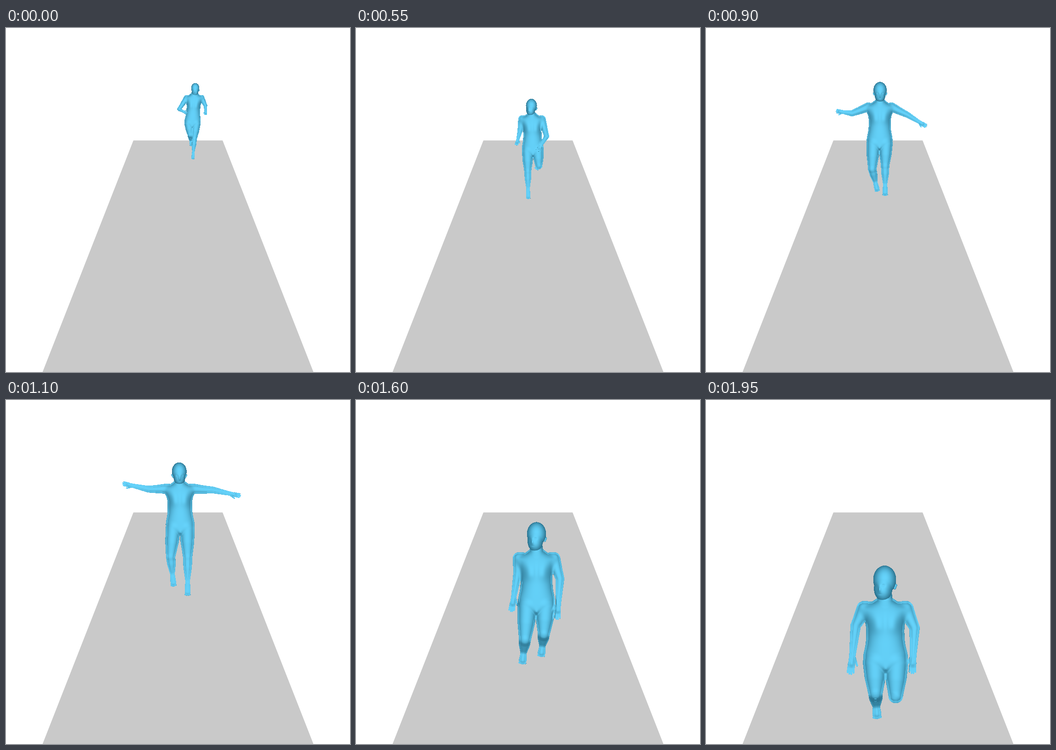
Write an HTML page with a canvas that moves like this. It is 748 px wide and 748 px high and loops after 2000 ms.

```html
<!DOCTYPE html>
<html lang="en">
<head>
<meta charset="utf-8">
<title>Running figure</title>
<style>
  html, body { margin: 0; width: 100%; height: 100%; overflow: hidden; background: #fff; }
  svg, canvas { position: absolute; left: 0; top: 0; width: 748px; height: 748px; display: block; }
</style>
</head>
<body>
<svg viewBox="0 0 748 748"><path d="M277 244.5H471L668.5 748H79.5Z" fill="#c9c9c9"/></svg>
<canvas id="stage" width="748" height="748"></canvas>
<script>
const SIZE = 748, LOOP = 2000, STEP = 50;
const ctx = document.getElementById('stage').getContext('2d');
const image = ctx.createImageData(SIZE, SIZE);
const height = new Float32Array(SIZE * SIZE);
const DARK = [40, 110, 137], LIGHT = [102, 212, 252];

// Key poses: the third head value is its turn, pairs go left then right.
const keys = [
  { time: 0, head: [411, 133, -.15], hip: [405, 203],
    elbows: [376, 176, 433, 168], hands: [392, 185, 434, 189],
    knees: [400, 232, 409, 240], toes: [402, 252, 406, 281] },
  { time: 200, head: [411, 156, .1], hip: [397, 227],
    elbows: [370, 202, 429, 200], hands: [361, 240, 436, 235],
    knees: [386, 263, 405, 264], toes: [389, 270, 401, 301] },
  { time: 550, head: [381, 172, -.5], hip: [384, 262],
    elbows: [356, 224, 414, 235], hands: [348, 255, 393, 268],
    knees: [373, 311, 397, 299], toes: [374, 366, 394, 303] },
  { time: 900, head: [378, 139, 0], hip: [377, 245],
    elbows: [317, 185, 437, 188], hands: [282, 180, 480, 214],
    knees: [361, 306, 389, 299], toes: [371, 349, 389, 358] },
  { time: 1300, head: [377, 256, 0], hip: [382, 375],
    elbows: [312, 285, 457, 288], hands: [243, 282, 519, 300],
    knees: [357, 450, 402, 455], toes: [357, 521, 401, 538] },
  { time: 1600, head: [392, 297, -.45], hip: [392, 440],
    elbows: [351, 376, 443, 388], hands: [337, 462, 437, 479],
    knees: [367, 520, 408, 508], toes: [362, 565, 403, 549] },
  { time: 1950, head: [388, 398, -.45], hip: [390, 562],
    elbows: [325, 490, 453, 495], hands: [313, 599, 448, 597],
    knees: [368, 637, 412, 643], toes: [371, 682, 411, 645] }
];

const clamp = (v, lo, hi) => Math.min(hi, Math.max(lo, v));
const mix = (a, b, t) => a + (b - a) * t;
const between = (p, q, t) => [mix(p[0], q[0], t), mix(p[1], q[1], t)];
const bell = (x, y, w) => Math.exp(-(x * x + y * y) / (w * w));

// The figure grows as it nears the camera.
const scaleAt = time => 18 * Math.exp(time / 1910);

function hermite(a, b, ma, mb, u) {
  const v = u * u, w = v * u;
  return (2*w - 3*v + 1) * a + (w - 2*v + u) * ma + (3*v - 2*w) * b + (w - v) * mb;
}

function poseAt(time) {
  const last = keys.length - 1;
  let i = 0;
  while (i < last - 1 && time >= keys[i + 1].time) i++;
  const a = keys[i], b = keys[i + 1], p = keys[Math.max(0, i - 1)], n = keys[Math.min(last, i + 2)];
  const span = b.time - a.time, u = (time - a.time) / span;
  const blend = part => a[part].map((v, j) => {
    const w = b[part][j];
    const ma = (w - p[part][j]) / (b.time - p.time) * span;
    const mb = (n[part][j] - v) / (n.time - a.time) * span;
    return hermite(v, w, ma, mb, u);
  });
  return Object.fromEntries(Object.keys(a).filter(k => k !== 'time').map(k => [k, blend(k)]));
}

const softMax = (a, b, seam) => Math.max(a, b) + Math.max(0, seam - Math.abs(a - b)) ** 2 / (4 * seam);

// Merge one surface into the height map with a soft seam.
function splat(x0, y0, x1, y1, seam, surface) {
  x0 = Math.max(1, Math.floor(x0)); y0 = Math.max(1, Math.floor(y0));
  x1 = Math.min(SIZE - 2, Math.ceil(x1)); y1 = Math.min(SIZE - 2, Math.ceil(y1));
  for (let y = y0; y <= y1; y++) for (let x = x0; x <= x1; x++) {
    const h = surface(x, y), i = y * SIZE + x;
    if (h > -Infinity) height[i] = softMax(height[i], h, seam);
  }
}

// Round tube along points [x, y, radius, z].
function tube(pts, seam) {
  const low = k => Math.min(...pts.map(p => p[k] - p[2]));
  const high = k => Math.max(...pts.map(p => p[k] + p[2]));
  splat(low(0), low(1), high(0), high(1), seam, (x, y) => {
    let near = Infinity, r = 0, z = 0;
    for (let i = 1; i < pts.length; i++) {
      const a = pts[i - 1], b = pts[i], dx = b[0] - a[0], dy = b[1] - a[1];
      const t = clamp(((x - a[0]) * dx + (y - a[1]) * dy) / (dx * dx + dy * dy || 1), 0, 1);
      const gap = (x - a[0] - dx * t) ** 2 + (y - a[1] - dy * t) ** 2;
      if (gap < near) { near = gap; r = mix(a[2], b[2], t); z = mix(a[3], b[3], t); }
    }
    return near < r * r ? z + Math.sqrt(r * r - near) : -Infinity;
  });
}

function torso(chest, hip, s) {
  const len = hip[1] - chest[1];
  const width = v => s * (.83 + .27 * bell(v, 0, .2) + .15 * bell(v - 1, 0, .25))
    * (1 - .6 * clamp(-v / .22, 0, 1)) * clamp((1.27 - v) / .27, 0, 1);
  splat(chest[0] - 2 * s, chest[1] - len * .22, chest[0] + 2 * s, chest[1] + len * 1.26, s * .2, (x, y) => {
    const v = (y - chest[1]) / len, u = (x - mix(chest[0], hip[0], v)) / width(v);
    if (Math.abs(u) >= 1) return -Infinity;
    const roll = Math.sqrt(1 - (Math.max(0, .3 - v) / .6) ** 2);
    const drop = (v - .33) * (v > .33 ? 6 : 3);
    const bust = bell((Math.abs(u) - .42) * 2.5, drop, 1);
    return s * ((.68 - .12 * v * v) * roll * Math.sqrt(1 - u * u) + .14 * bust);
  });
}

function arm(chest, hip, elbow, hand, side, s) {
  const depth = s * clamp(1.6 - 1.2 * Math.abs(hand[0] - hip[0]) / s, 0, 1);
  const wrist = between(elbow, hand, .57);
  const dx = hand[0] - wrist[0], dy = hand[1] - wrist[1], len = Math.hypot(dx, dy) || 1;
  const spot = (along, across, r) =>
    [wrist[0] + dx * along + dy / len * across * s, wrist[1] + dy * along - dx / len * across * s, r * s, depth];
  tube([
    [chest[0] + side * s * .4, chest[1] - s * .02, s * .3, s * .12],
    [chest[0] + side * s * .9, chest[1] - s * .02, s * .35, 0],
    [...between([chest[0] + side * s * .9, chest[1]], elbow, .55), s * .28, depth * .3],
    [...elbow, s * .23, depth * .6],
    spot(0, 0, .145), spot(.45, 0, .14)
  ], s * .2);
  for (const f of [-1, -.33, .33, 1]) {
    tube([spot(.4, f * .1, .055), spot(.95 - Math.abs(f) * .1, f * .13, .04)], 1);
  }
  tube([spot(.1, -side * .08, .06), spot(.5, -side * .25, .045)], 1);
}

function leg(chest, hip, knee, toe, side, s) {
  const root = [hip[0] + side * s * .47, mix(chest[1], hip[1], 1.08)];
  const dx = toe[0] - knee[0], dy = toe[1] - knee[1], len = Math.hypot(dx, dy) || 1;
  // A short shin points away from the camera.
  const back = -s * clamp(1.3 - .6 * len / s, 0, 1);
  tube([[...root, s * .52, 0], [...between(root, knee, .5), s * .46, 0], [...knee, s * .32, 0]], s * .2);
  tube([
    [...knee, s * .32, 0],
    [...between(knee, toe, .3), s * .29, back * .4],
    [...between(knee, toe, .67), s * .16, back * .9],
    [...toe, s * .2, back]
  ], s * .1);
  for (let k = -2; k <= 2; k++) {
    const a = s * (.19 - Math.abs(k) * .02) / len, b = s * .08 * k / len;
    const tip = [toe[0] + dx * a + dy * b, toe[1] + dy * a - dx * b, s * .05, back + s * .05];
    tube([tip, tip], 1);
  }
}

function head([cx, cy, turn], chest, s) {
  const rx = s * .5, ry = s * .77, z = s * .25;
  const pitch = .35 + .9 * clamp(1.1 - (chest[1] - cy) / s, 0, .35);
  tube([[chest[0], chest[1] - s * .15, s * .34, s * .1], [cx, cy + ry * .3, s * .3, z * .5]], s * .2);
  for (const e of [-1, 1]) {
    if (e * turn > .12) continue;
    const x = cx + e * rx * .93, y = cy + ry * .12;
    tube([[x, y, s * .08, z], [x - e * rx * .05, y + ry * .16, s * .05, z]], 1);
  }
  const dome = (x, y, ox, oy, w, h) => {
    const q = 1 - ((x - ox) / w) ** 2 - ((y - oy) / h) ** 2;
    return q > 0 ? z + 1.1 * rx * Math.sqrt(q) : -Infinity;
  };
  const nx = cx + turn * rx, ny = cy + pitch * ry;
  splat(cx - rx * 1.2, cy - ry, cx + rx * 1.2, cy + ry, 1, (x, y) => {
    const skull = dome(x, y, cx, cy - ry * .2, rx, ry * .8);
    const jaw = dome(x, y, cx + turn * rx * .3, cy + ry * .3, rx * .8, ry * .7);
    const top = skull === jaw ? skull : softMax(skull, jaw, rx * .3);
    const u = (x - nx) / rx, v = (y - ny) / ry;
    const eyes = bell(Math.abs(u) - .33, (v + .22) * 1.8, .16);
    const nose = bell(u, v * .8, .13), mouth = bell(u * .4, (v - .26) * 1.4, .07);
    return top + rx * (.15 * nose - .06 * eyes - .03 * mouth);
  });
}

// Average the height with neighbours of similar depth.
function soften(s) {
  const reach = Math.round(s * .08), limit = s * .3;
  for (const step of [1, SIZE]) {
    const src = height.slice();
    for (let i = 0; i < src.length; i++) {
      if (src[i] === -Infinity) continue;
      let sum = 0, count = 0;
      for (let k = -reach; k <= reach; k++) {
        const h = src[i + k * step];
        if (Math.abs(h - src[i]) < limit) { sum += h; count++; }
      }
      height[i] = sum / count;
    }
  }
}

// Slope on the side without a depth step.
function slope(i, step) {
  const a = height[i] - height[i - step], b = height[i + step] - height[i];
  return clamp(Math.abs(a) < Math.abs(b) ? a : b, -3, 3);
}

function shade() {
  const px = image.data;
  px.fill(0);
  for (let i = 0; i < height.length; i++) {
    if (height[i] === -Infinity) continue;
    const gx = slope(i, 1), gy = slope(i, SIZE);
    const lit = clamp((.99 + .1 * gy) / Math.hypot(gx, gy, 1), 0, 1) ** 2;
    for (let c = 0; c < 3; c++) px[i * 4 + c] = mix(DARK[c], LIGHT[c], lit);
    px[i * 4 + 3] = 255;
  }
}

function draw(time) {
  const pose = poseAt(time), s = scaleAt(time), hip = pose.hip;
  // The trunk looks shorter as the camera sees it from higher up.
  const chest = [mix(hip[0], pose.head[0], .6), hip[1] - s * (2.85 - .36 * time / 1000)];
  height.fill(-Infinity);
  torso(chest, hip, s);
  for (const side of [-1, 1]) {
    const pair = name => pose[name].slice(side + 1, side + 3);
    leg(chest, hip, pair('knees'), pair('toes'), side, s);
    arm(chest, hip, pair('elbows'), pair('hands'), side, s);
  }
  soften(s);
  head(pose.head, chest, s);
  shade();
  // Extra rise while falling from the top of the jump.
  const fall = clamp((time - 900) / 400, 0, 1);
  ctx.clearRect(0, 0, SIZE, SIZE);
  ctx.putImageData(image, 0, -Math.round(32 * Math.sin(Math.PI * fall) ** 2));
}

const start = performance.now();
let shown = -1;
function tick() {
  const time = Math.floor((performance.now() - start) % LOOP / STEP) * STEP;
  if (time !== shown) draw(shown = time);
  requestAnimationFrame(tick);
}
tick();
</script>
</body>
</html>
```
